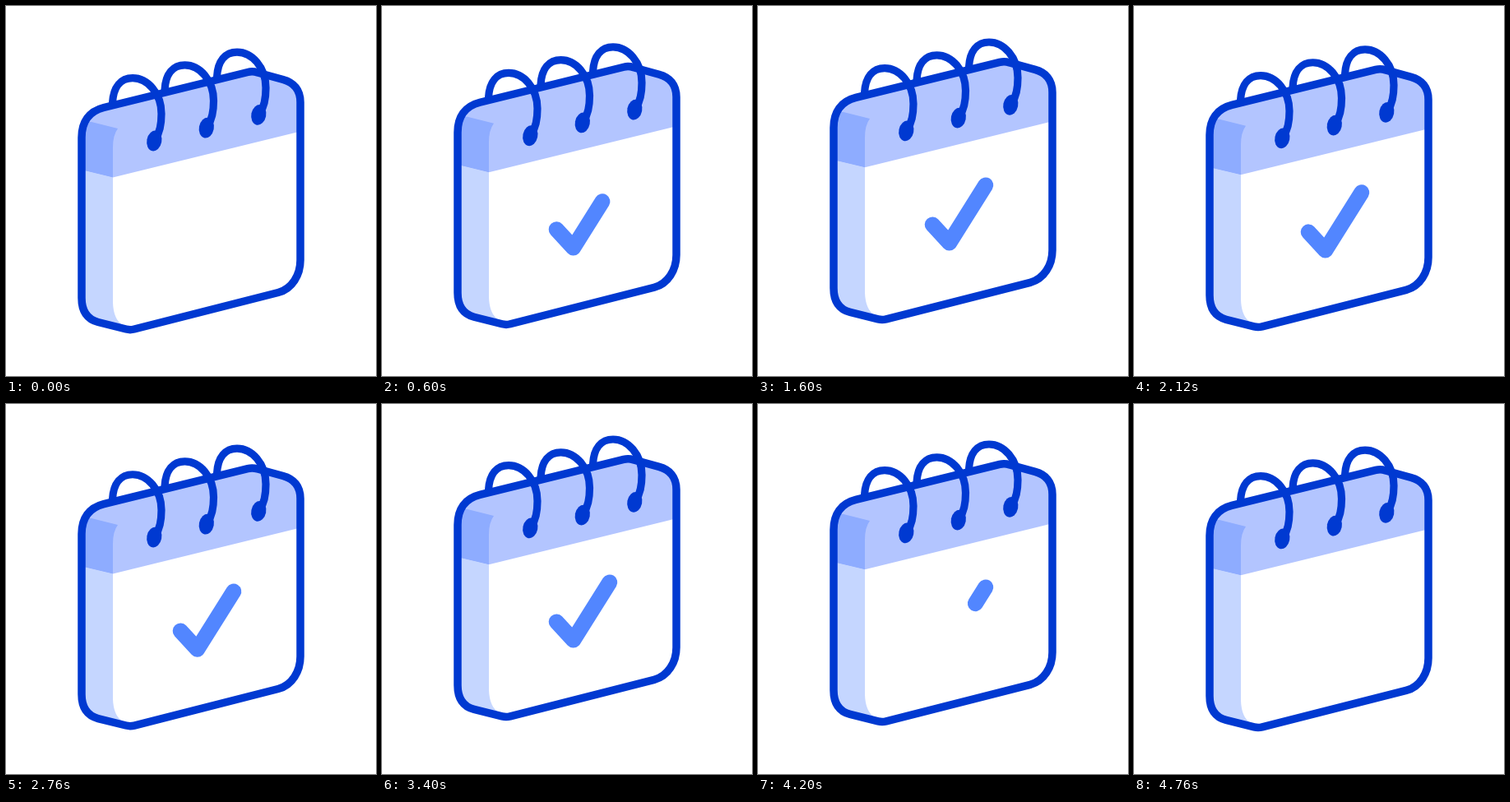
These frames come from a looping animation (450 px wide and 450 px high, 4800 ms). An HTML page with a canvas:

```html
<!DOCTYPE html>
<html lang="en">
<head>
<meta charset="utf-8">
<title>Calendar</title>
<style>
  html, body { margin: 0; width: 100%; height: 100%; overflow: hidden; background: #fff; }
  canvas { display: block; width: 450px; height: 450px; }
</style>
</head>
<body>
<canvas id="stage" width="450" height="450"></canvas>
<script>
const ctx = document.getElementById('stage').getContext('2d');
const LOOP = 4800, STEP = 40, RISE = 14.2;
const INK = '#0039d1', HEADER = '#b3c5ff', HEADER_SIDE = '#8eacff', SIDE = '#c5d6ff', TICK = '#5286ff';

const body = new Path2D(`M92 160 C92 141 101 128 119 123.500 L294 80.500 Q300 79 306 81
  L337 89.500 C350 93 358 102 358 117 L358 309 C358 327 348 344 331 348.500
  L156 393 Q151 394.300 146 393 L112 384.500 C99 381 92 371 92 355 Z`);
const header = new Path2D('M88 70 H362 V151.400 L130 208.400 L88 198.400 Z');
const headerSide = new Path2D('M88 141 L104 141 L136 149 Q130 157 130 172 V208.400 L88 198.400 Z');
const side = new Path2D('M88 198.400 L130 208.400 V358 C130 377 136 388 151 392 V400 H88 Z');
const ring = new Path2D('M129.500 118 C130.500 98 140 87.700 154 87.700 C172 87.700 189 106 189 131 C189 145 187 154 182 161');

const tick = [[212.2, 278], [232.7, 300.2], [276.8, 230]];
const lengths = [0, 1].map(i => Math.hypot(tick[i + 1][0] - tick[i][0], tick[i + 1][1] - tick[i][1]));
const tickLength = lengths[0] + lengths[1];

// Eased progress from 0 to 1 between two times
function ease(t, start, end) {
  const p = Math.min(1, Math.max(0, (t - start) / (end - start)));
  return (1 - Math.cos(Math.PI * p)) / 2;
}

function lift(t) {
  return RISE * (ease(t, 0, 1300) - ease(t, 1300, 2490) + ease(t, 2490, 3600) - ease(t, 3600, 4800));
}

function fill(path, color) {
  ctx.fillStyle = color;
  ctx.fill(path);
}

function pointAt(distance) {
  const i = distance < lengths[0] ? 0 : 1;
  const k = (distance - i * lengths[0]) / lengths[i];
  return tick[i].map((v, axis) => v + (tick[i + 1][axis] - v) * k);
}

function drawTick(from, to) {
  if (to - from < 0.001) return;
  const start = from * tickLength, end = to * tickLength;
  ctx.beginPath();
  ctx.moveTo(...pointAt(start));
  if (start < lengths[0] && end > lengths[0]) ctx.lineTo(...tick[1]);
  ctx.lineTo(...pointAt(end));
  ctx.strokeStyle = TICK;
  ctx.lineWidth = 19;
  ctx.stroke();
}

function drawRing(index) {
  ctx.save();
  ctx.translate(index * 63.5, index * -15.8);
  ctx.lineWidth = 9.2;
  ctx.stroke(ring);
  ctx.beginPath();
  ctx.ellipse(180.3, 164, 9, 12.5, 0.2, 0, Math.PI * 2);
  ctx.fillStyle = INK;
  ctx.fill();
  ctx.restore();
}

function draw(t) {
  ctx.fillStyle = '#fff';
  ctx.fillRect(0, 0, 450, 450);
  ctx.save();
  ctx.translate(0, -lift(t));
  ctx.lineCap = ctx.lineJoin = 'round';

  ctx.save();
  ctx.clip(body);
  fill(body, '#fff');
  fill(header, HEADER);
  fill(side, SIDE);
  fill(headerSide, HEADER_SIDE);
  ctx.restore();

  drawTick(ease(t, 3640, 4440), ease(t, 0, 800));

  ctx.strokeStyle = INK;
  ctx.lineWidth = 9.5;
  ctx.stroke(body);
  for (let i = 0; i < 3; i++) drawRing(i);
  ctx.restore();
}

const began = performance.now();
function frame() {
  const t = (performance.now() - began) % LOOP;
  draw(Math.floor(t / STEP) * STEP);
  requestAnimationFrame(frame);
}
frame();
</script>
</body>
</html>
```
